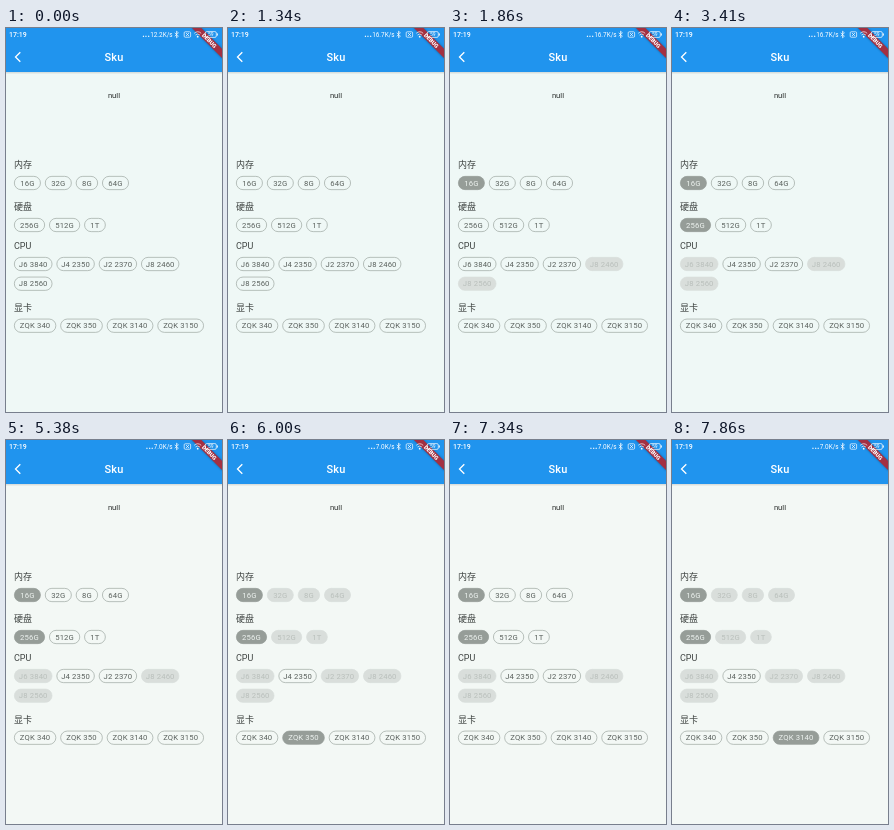
Write an HTML page that moves like this. It is 216 px wide and 384 px high and loops after 8 s.

```html
<!DOCTYPE html>
<html lang="zh">
<head>
<meta charset="utf-8">
<title>Sku</title>
<style>
  html, body { margin: 0; width: 100%; height: 100%; overflow: hidden; background: #eff8f6; }
  svg { display: block; width: 100vw; height: 100vh; font-family: Roboto, "Noto Sans CJK SC", "Noto Sans CJK", sans-serif; }
  .page { fill: #eff8f6; animation: tint 8s step-end infinite; }
  @keyframes tint { 67.25% { fill: #f3f8f5; } }
  .bar { fill: #2094ee; }
  .white { fill: #fff; }
  .line { fill: none; stroke: #fff; stroke-width: .7; }
  .title { font-size: 11px; font-weight: 500; letter-spacing: .1px; }
  .label { font-size: 9px; fill: #3c413f; }
  .chip rect { fill: none; stroke: #9da6a1; stroke-width: .7; }
  .chip text { font-size: 7.7px; letter-spacing: .14px; text-anchor: middle; fill: #5a615d; }
  .chip.on rect { fill: #969d98; stroke: #969d98; }
  .chip.on text { fill: #eef3f0; }
  .chip.off rect { fill: #d9dedb; stroke: #d9dedb; }
  .chip.off text { fill: #b9bfbb; }
</style>
</head>
<body>
<svg viewBox="0 0 216 384" preserveAspectRatio="none">
  <defs>
    <linearGradient id="shade" x2="0" y2="1">
      <stop offset="0" stop-color="#000" stop-opacity=".13"/>
      <stop offset="1" stop-color="#000" stop-opacity="0"/>
    </linearGradient>
    <filter id="blur" x="-20%" y="-60%" width="140%" height="220%"><feGaussianBlur stdDeviation="1.2"/></filter>
  </defs>
  <rect class="page" width="216" height="384"/>
  <rect y="44" width="216" height="2.4" fill="url(#shade)"/>
  <rect class="bar" width="216" height="44"/>

  <g transform="translate(216 0) rotate(45)">
    <rect x="-22" y="14.6" width="44" height="6.6" fill="#000" opacity=".35" filter="url(#blur)"/>
    <rect x="-32" y="14.6" width="64" height="6.6" fill="#a33042"/>
    <text class="white" y="19.9" font-size="5.6" font-weight="900" text-anchor="middle">DEBUG</text>
  </g>

  <!-- The system status icons lie above the banner. -->
  <g class="white">
    <text x="3" y="9.1" font-size="7" font-weight="500">17:19</text>
    <text x="166.6" y="8.9" font-size="6.4" text-anchor="end"><tspan font-size="8.5" font-weight="700" letter-spacing=".2">...</tspan><tspan id="speed">12.2K/s</tspan></text>
    <text class="title" x="108" y="33" text-anchor="middle">Sku</text>
  </g>
  <path class="line" d="M168.7 4.8 172.4 8.2 170.5 9.8V3.2L172.4 4.8 168.7 8.2"/>
  <rect class="line" x="178.2" y="3.8" width="6.4" height="5.4" rx="1"/>
  <path class="line" d="M180 5 183 8M183 5 180 8"/>
  <path class="line" d="M188.2 5.3Q191.7 2.2 195.2 5.3M189.5 7Q191.7 5 193.9 7"/>
  <circle class="white" cx="191.7" cy="8.7" r=".9"/>
  <rect class="line" x="199.3" y="3.6" width="11" height="5.8" rx="1.4"/>
  <text class="white" x="204.8" y="8.4" font-size="5" text-anchor="middle">59</text>
  <rect class="white" x="210.8" y="5.4" width="1" height="2.2"/>
  <path d="M14.3 24.2 9.5 29 14.3 33.8" fill="none" stroke="#fff" stroke-width="1.3"/>

  <text x="108" y="70.1" font-size="7.7" fill="#2c302e" text-anchor="middle">null</text>
  <g id="list"></g>
</svg>
<script>
  const LOOP = 8000;
  const list = document.getElementById("list");
  const speed = document.getElementById("speed");
  const chips = [];

  function add(parent, tag, attrs, text = "") {
    const el = document.createElementNS("http://www.w3.org/2000/svg", tag);
    for (const key in attrs) el.setAttribute(key, attrs[key]);
    el.textContent = text;
    return parent.appendChild(el);
  }

  function label(text, mid) {
    add(list, "text", { class: "label", x: 8, y: mid + 3.3 }, text);
  }

  // Each item is [text, width]; chips flow from the left margin.
  function row(mid, items) {
    let x = 8;
    for (const [text, w] of items) {
      const chip = add(list, "g", { class: "chip" });
      add(chip, "rect", { x: x + .35, y: mid - 6.65, width: w - .7, height: 13.3, rx: 6.65 });
      add(chip, "text", { x: x + w / 2, y: mid + 2.75 }, text);
      chips.push(chip);
      x += w + 4.1;
    }
  }

  label("内存", 136.7);
  row(155, [["16G", 26.8], ["32G", 26.8], ["8G", 22.2], ["64G", 26.8]]);
  label("硬盘", 178.7);
  row(197, [["256G", 31], ["512G", 31], ["1T", 21.5]]);
  label("CPU", 218);
  row(236, [["J6 3840", 38.4], ["J4 2350", 38.2], ["J2 2370", 38.2], ["J8 2460", 38.2]]);
  row(255.7, [["J8 2560", 38.4]]);
  label("显卡", 279.7);
  row(297.7, [["ZQK 340", 42.2], ["ZQK 350", 42.4], ["ZQK 3140", 46.5], ["ZQK 3150", 46.5]]);

  const only = [1, 2, 3, 5, 6, 7, 9, 10, 11];
  // Start time, selected chips, disabled chips.
  const picks = [
    [0, [], []],
    [1860, [0], [10, 11]],
    [3410, [0, 4], [7, 10, 11]],
    [5070, [0, 4, 12], [7, 9, 10, 11]],
    [5380, [0, 4], [7, 10, 11]],
    [6000, [0, 4, 13], only],
    [7340, [0, 4], [7, 10, 11]],
    [7860, [0, 4, 14], only]
  ];
  const speeds = [[0, "12.2K/s"], [1340, "16.7K/s"], [5280, "7.0K/s"]];
  const current = (steps, t) => steps.filter(s => s[0] <= t).pop();
  let shown;

  function draw() {
    const t = performance.now() % LOOP;
    const pick = current(picks, t);
    const rate = current(speeds, t)[1];
    if (speed.textContent !== rate) speed.textContent = rate;
    if (pick !== shown) {
      shown = pick;
      chips.forEach((chip, i) => {
        const state = pick[1].includes(i) ? " on" : pick[2].includes(i) ? " off" : "";
        chip.setAttribute("class", "chip" + state);
      });
    }
    requestAnimationFrame(draw);
  }
  draw();
</script>
</body>
</html>
```
